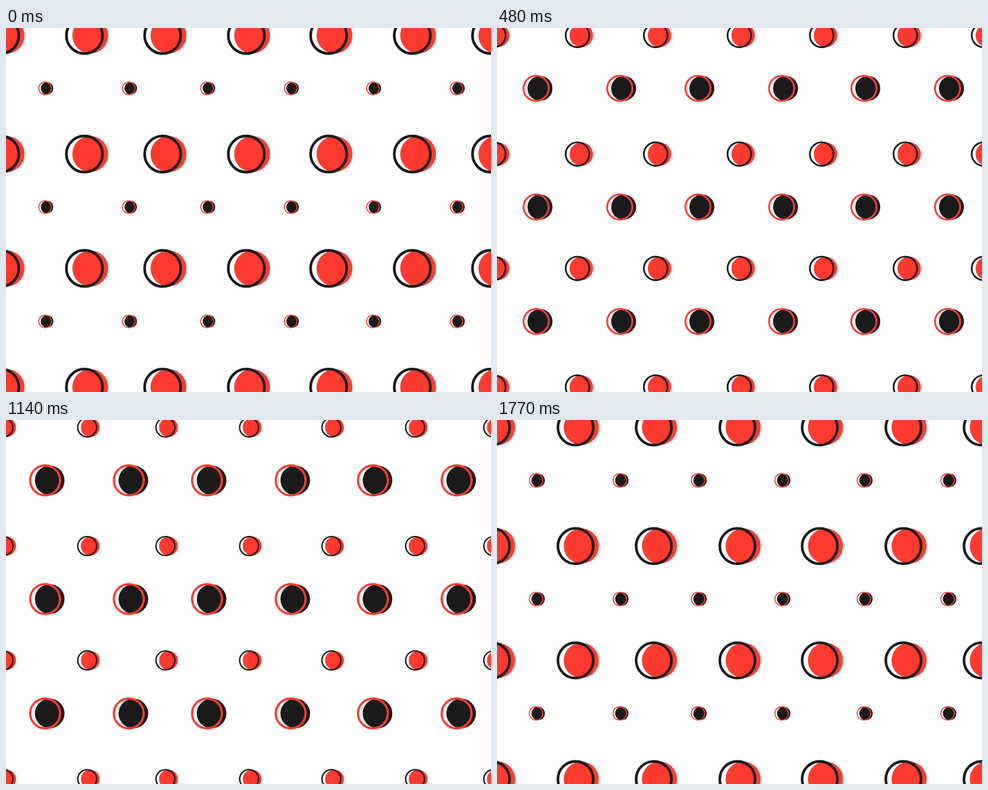
Animation, 800 px wide and 600 px high, one loop 1800 ms. Source, as an HTML page:

```html
<!DOCTYPE html>
<html lang="en">
<head>
<meta charset="utf-8">
<title>Pulsing dots</title>
<style>
  html, body { margin: 0; width: 100%; height: 100%; overflow: hidden; background: #fff; }
  svg { display: block; width: 800px; height: 600px; }
</style>
</head>
<body>
<svg id="stage" viewBox="0 0 800 600"></svg>
<script>
const RED = '#ff3b30', DARK = '#1a1a1a';
const LOOP = 1800, STEP = 30, MIN_SCALE = 0.35;
const stage = document.getElementById('stage');

function add(parent, tag, attrs) {
  const node = document.createElementNS('http://www.w3.org/2000/svg', tag);
  for (const key in attrs) node.setAttribute(key, attrs[key]);
  return parent.appendChild(node);
}

// Each dot is a filled disc under an offset ring, scaled about its own origin.
function makeDots(xs, ys, fill, stroke, discX, ringX) {
  return ys.flatMap(y => xs.map(x => {
    const node = add(stage, 'g', {});
    add(node, 'circle', { cx: discX, r: 29.6, fill });
    add(node, 'circle', { cx: ringX, r: 29.8, fill: 'none', stroke, 'stroke-width': 4.4 });
    return { node, x, y };
  }));
}

const redDots = makeDots([1, 139, 268, 406, 541.8, 679.8, 808.8],
  [12.3, 207.8, 396.3, 591.9], RED, DARK, 0, -9.6);
const darkDots = makeDots([64.5, 202.5, 331.5, 469.5, 605.2, 743.2],
  [99.5, 295.1, 483.7], DARK, RED, 9.2, 0);

function setScale(dots, scale) {
  for (const { node, x, y } of dots)
    node.setAttribute('transform', `translate(${x} ${y}) scale(${scale})`);
}

function render(ms) {
  const t = Math.floor((ms % LOOP) / STEP) * STEP;
  const progress = 1 - Math.abs(1 - t / (LOOP / 2));
  const change = (1 - MIN_SCALE) * progress;
  setScale(redDots, 1 - change);
  setScale(darkDots, MIN_SCALE + change);
}

const start = performance.now();
function tick() {
  render(performance.now() - start);
  requestAnimationFrame(tick);
}
tick();
</script>
</body>
</html>
```
